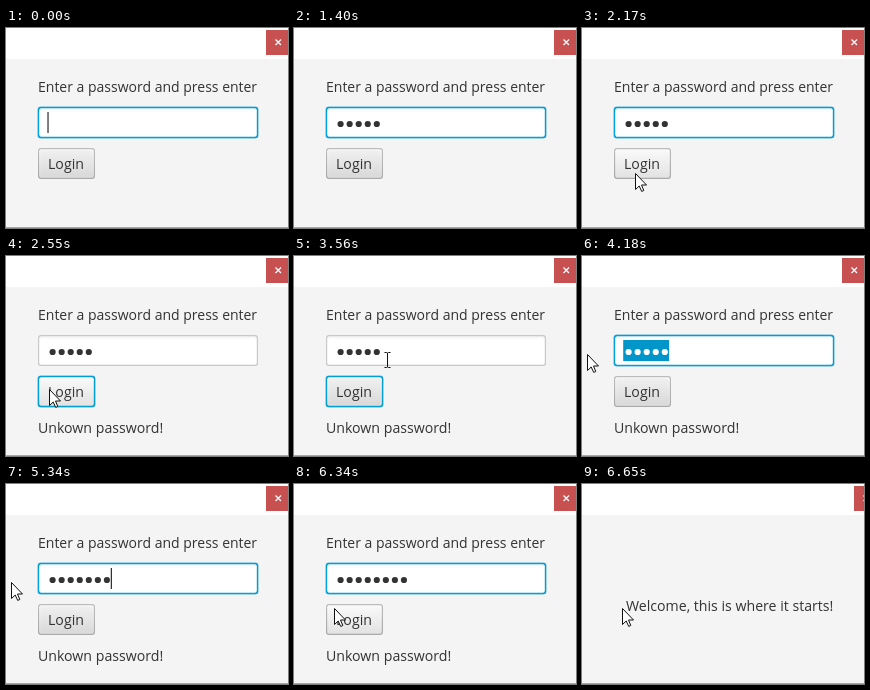
Write an HTML page that moves like this. It is 282 px wide and 200 px high and loops after 6950 ms.

```html
<!DOCTYPE html>
<html lang="en">
<head>
<meta charset="utf-8">
<title>Password form</title>
<style>
html, body { margin: 0; width: 100%; height: 100%; overflow: hidden; background: #fff; }
svg { display: block; }
text { font: 14.15px "Open Sans", "Noto Sans", sans-serif; fill: #333; white-space: pre; }
.glow { fill: #039ed3; fill-opacity: .14; }
.ring { fill: #039ed3; }
</style>
</head>
<body>
<svg width="282" height="200" viewBox="0 0 282 200">
  <defs>
    <linearGradient id="edge" x2="0" y2="1"><stop stop-color="#bcbcbc"/><stop offset="1" stop-color="#a9a9a9"/></linearGradient>
    <linearGradient id="rim" x2="0" y2="1"><stop stop-color="#fdfdfd"/><stop offset="1" stop-color="#e2e2e2"/></linearGradient>
    <linearGradient id="idle" x2="0" y2="1"><stop stop-color="#f0f0f0"/><stop offset="1" stop-color="#d9d9d9"/></linearGradient>
    <linearGradient id="hover" x2="0" y2="1"><stop stop-color="#f9f9f9"/><stop offset="1" stop-color="#e3e3e3"/></linearGradient>
    <linearGradient id="down" x2="0" y2="1"><stop stop-color="#dcdcdc"/><stop offset="1" stop-color="#c8c8c8"/></linearGradient>
    <linearGradient id="inner" x2="0" y2="1"><stop stop-color="#f4f4f4"/><stop offset=".15" stop-color="#fff"/></linearGradient>
  </defs>

  <rect width="282" height="200" fill="#fff"/>
  <rect y="31" width="282" height="168" fill="#f4f4f4"/>
  <rect y="199" width="282" height="1" fill="#a8a8a8"/>
  <g id="close">
    <rect y="2" width="40" height="25" fill="#c75050"/>
    <path d="M9.5 11.5l5.5 5.5m0-5.5l-5.5 5.5" stroke="#fff" stroke-width="1.3"/>
  </g>

  <g id="form">
    <text x="32" y="64" style="font-size:14px">Enter a password and press enter</text>
    <g id="fieldFocus">
      <rect class="glow" x="31" y="78" width="222" height="33" rx="4"/>
      <rect class="ring" x="31.75" y="78.75" width="220.5" height="31.5" rx="3"/>
    </g>
    <rect id="fieldEdge" x="32" y="79" width="220" height="31" rx="3" fill="#c8c8c8"/>
    <rect x="33.2" y="80.2" width="217.6" height="28.6" rx="2" fill="url(#inner)"/>
    <rect id="selection" y="84" height="21" fill="#0096c9"/>
    <g id="dots"></g>
    <rect id="caret" y="84" width="1.25" height="21" fill="#333"/>

    <g id="buttonFocus">
      <rect class="glow" x="31" y="119" width="59" height="33" rx="4"/>
      <rect class="ring" x="31.75" y="119.75" width="57.5" height="31.5" rx="3"/>
    </g>
    <rect id="buttonEdge" x="32" y="120" width="57" height="31" rx="3" fill="url(#edge)"/>
    <rect x="33.2" y="121.2" width="54.6" height="28.6" rx="2" fill="url(#rim)"/>
    <rect id="body" x="34.2" y="122.2" width="52.6" height="26.6" rx="1.5"/>
    <text x="42" y="141">Login</text>
    <text id="error" x="32" y="177">Unkown password!</text>
  </g>

  <text id="welcome" x="44" y="127">Welcome, this is where it starts!</text>

  <path id="arrow" d="M.5 .5V16.5L4.2 13L6.7 18.4L8.8 17.5L6.5 12H11.5Z" fill="#fff" stroke="#111"/>
  <path id="beam" d="M-3-7.5H-1L0-7L1-7.5H3M-3 7.5H-1L0 7L1 7.5H3M0-7V7" fill="none" stroke="#111"/>
</svg>
<script>
const LOOP = 6950, STEP = 77, PITCH = 9.05, LEFT = 42;
const $ = id => document.getElementById(id);
const show = (id, on) => $(id).setAttribute("display", on ? "inline" : "none");
const set = (id, attrs) => { for (const k in attrs) $(id).setAttribute(k, attrs[k]); };
const within = (t, a, b) => t >= a && t < b;
const inside = (x, y, top) => y >= top && y < top + 31 && x >= 32;

// Pointer moves: start time, number of steps, start, bend and end of a curve
const moves = [
  { at: 1550, steps: 10, path: [[167, 26], [60, 185], [43, 133]] },
  { at: 3023, steps: 10, path: [[43, 133], [117, 98], [84, 98]] },
  { at: 3790, steps: 5, path: [[84, 98], [-15, 94], [5, 98]] },
  { at: 5953, steps: 5, path: [[5, 98], [25, 116], [40, 124]] }
];
const firstKeys = [310, 540, 625, 710, 940];
const secondKeys = [4410, 4640, 4790, 4940, 5110, 5260, 5340, 5570];

function pointerAt(t) {
  const move = moves.filter(m => m.at <= t).pop();
  if (!move) return [-50, -50];
  const p = Math.min(1, Math.floor((t - move.at) / STEP) / move.steps), q = 1 - p;
  const [a, b, c] = move.path;
  return a.map((v, i) => Math.round(q * q * v + 2 * p * q * b[i] + p * p * c[i]));
}

const countAt = t =>
  (t < secondKeys[0] ? firstKeys : secondKeys).filter(key => key <= t).length;

const dots = Array.from({ length: 8 }, (_, i) => {
  const dot = document.createElementNS("http://www.w3.org/2000/svg", "circle");
  dot.setAttribute("cx", 46.6 + PITCH * i);
  dot.setAttribute("cy", 96);
  dot.setAttribute("r", 3.1);
  return $("dots").appendChild(dot);
});

function draw(t) {
  const done = t >= 6650;
  const count = countAt(t);
  const [x, y] = pointerAt(t);
  const overField = inside(x, y, 79) && x < 252;
  const overButton = inside(x, y, 120) && x < 89;
  const pressed = within(t, 2400, 2550) || within(t, 6490, 6650);
  const onButton = within(t, 2400, 3790) || t >= 6490;

  show("form", !done);
  show("welcome", done);
  set("close", { transform: `translate(${done ? 272 : 260})` });

  show("fieldFocus", !onButton);
  show("fieldEdge", onButton);
  show("buttonFocus", onButton);
  show("buttonEdge", !onButton);
  set("body", { fill: `url(#${pressed ? "down" : overButton ? "hover" : "idle"})` });
  show("error", t >= 2550);

  // Dragging left selects back from the end of the text.
  const dragging = within(t, 3790, 4410);
  const start = dragging ? Math.max(0, Math.min(5, Math.round((x - LEFT) / PITCH))) : count;
  set("selection", { x: LEFT - .8 + PITCH * start, width: PITCH * (count - start) + (start < count ? .6 : 0) });
  dots.forEach((dot, i) => {
    dot.setAttribute("display", i < count ? "inline" : "none");
    dot.setAttribute("fill", i >= start ? "#fff" : "#333");
  });
  show("caret", t < 1400 || within(t, 3790, 3867) || within(t, 4410, 6030));
  set("caret", { x: LEFT - .6 + PITCH * start });

  const beam = overField && !done;
  show("arrow", !beam);
  show("beam", beam);
  set(beam ? "beam" : "arrow", { transform: `translate(${beam ? x + .5 : x} ${y})` });
}

const begin = performance.now();
function tick() {
  draw((performance.now() - begin) % LOOP);
  requestAnimationFrame(tick);
}
tick();
</script>
</body>
</html>
```
